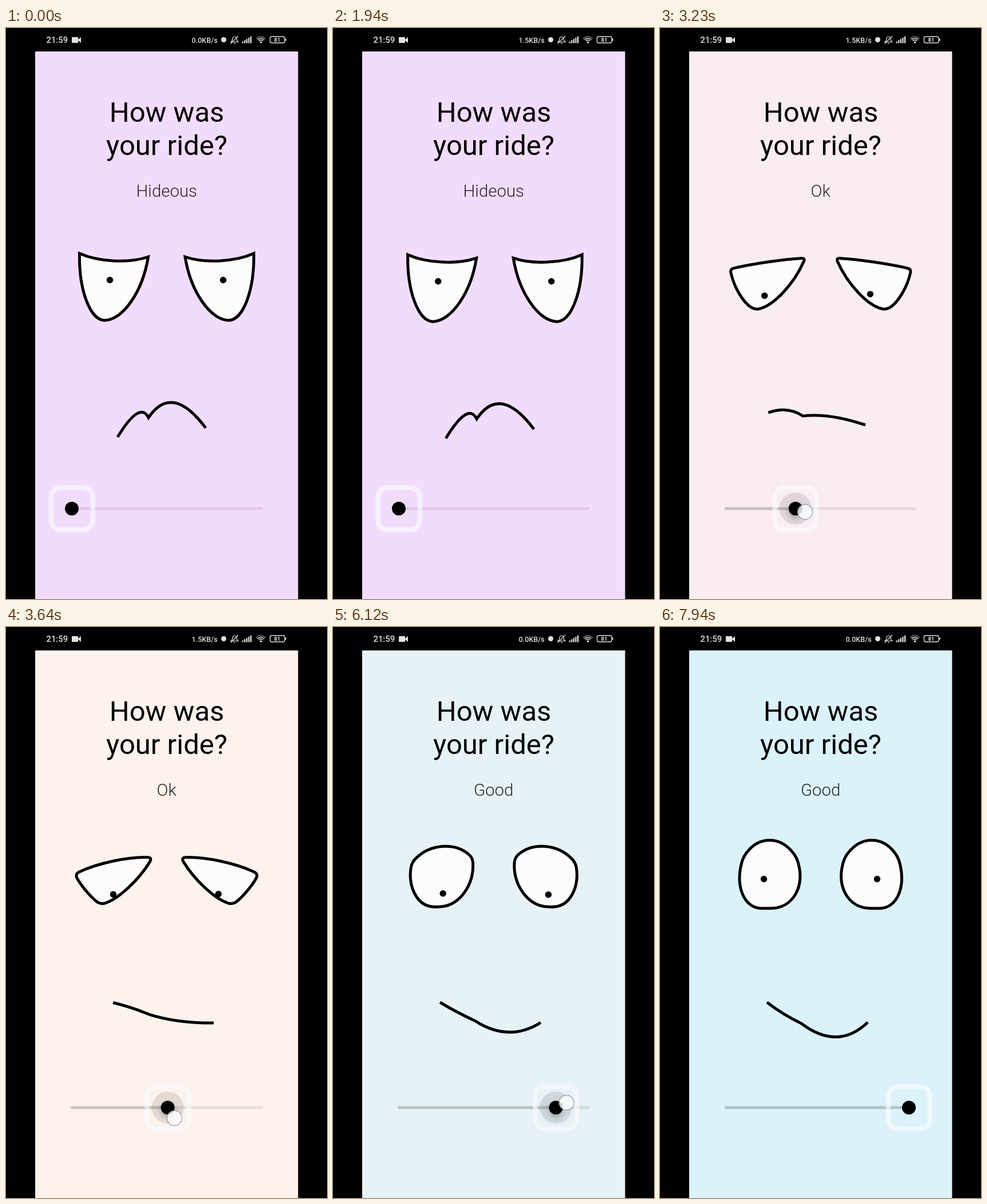
Recreate the animation shown at these times as an HTML page with a canvas. Size 561 by 998 pixels, loop 7990 ms.

```html
<!DOCTYPE html>
<html lang="en">
<head>
<meta charset="utf-8">
<title>Ride rating</title>
<style>
html, body { margin: 0; width: 100%; height: 100%; overflow: hidden; background: #000; }
canvas { display: block; width: 561px; height: 998px; }
</style>
</head>
<body>
<canvas id="stage" width="561" height="998"></canvas>
<script>
const c = document.getElementById("stage").getContext("2d");
const LOOP = 7990, TRACK_Y = 840, INK = "#e2e2e2";

// Moods along the slider. Eye: outer, inner and bottom corner, each followed by
// the point that pulls the edge to the next one. Mouth: two arcs.
const moods = [
  { x: 115, bg: [242, 220, 253], round: 0,
    eye: [[128.5, 394], [188, 421], [248.5, 400], [231, 510], [172, 511], [126, 509]],
    mouth: [[195, 715], [234, 651], [249, 681], [290, 620], [349, 699]] },
  { x: 284, bg: [253, 243, 236], round: 9,
    eye: [[120, 432], [188, 400], [256, 403], [215, 469], [165, 485], [138, 463]],
    mouth: [[187, 656], [218, 664], [250, 677], [298, 693], [363, 692]] },
  { x: 435, bg: [220, 242, 250], round: 10,
    eye: [[145, 403], [191, 341], [239, 403], [262, 488], [187, 492], [123, 490]],
    mouth: [[187, 656], [214, 677], [247, 693], [311, 741], [363, 691]] }
];

// Finger down, thumb starts and stops, finger up; finger offset drifts from a to b.
const drags = [
  { down: 2690, go: 2770, stop: 3800, up: 3880, from: 115, to: 286, a: [22, -8], b: [10, 23] },
  { down: 5350, go: 5720, stop: 6650, up: 6700, from: 286, to: 435, a: [10, 0], b: [30, -20] }
];
const shakes = [40, 1610], SHAKE_MS = 670;

const clamp = v => Math.max(0, Math.min(1, v));
const ease = (v, p = 3) => 1 - (1 - clamp(v)) ** p;
const mix = (a, b, k) => Array.isArray(a) ? a.map((v, i) => mix(v, b[i], k)) : a + (b - a) * k;
const progress = (d, t) => clamp((t - d.go) / (d.stop - d.go));
const thumbAt = t => drags.reduce((x, d) => x + (d.to - d.from) * ease(progress(d, t), 2.1), 115);

function pressure(t, rise, fall) {
  return Math.max(...drags.map(({ down, up }) =>
    t < up ? ease((t - down) / rise) : 1 - ease((t - up) / fall)));
}

function moodAt(x) {
  const [a, b] = x < moods[1].x ? moods : moods.slice(1);
  const k = (x - a.x) / (b.x - a.x), mood = {};
  for (const key in a) mood[key] = mix(a[key], b[key], k);
  return mood;
}

function disc(x, y, r, fill) {
  c.beginPath();
  c.arc(x, y, r, 0, Math.PI * 2);
  c.fillStyle = fill;
  c.fill();
}

function line(x0, y0, x1, y1) {
  c.beginPath();
  c.moveTo(x0, y0);
  c.lineTo(x1, y1);
  c.stroke();
}

function bar(x, w, fill) {
  c.fillStyle = fill;
  c.beginPath();
  c.roundRect(x, TRACK_Y - 2.5, w, 5, 2);
  c.fill();
}

function text(str, x, y, size, weight, fill, align = "center") {
  c.font = `${weight} ${size}px Roboto, sans-serif`;
  c.textAlign = align;
  c.fillStyle = fill;
  c.fillText(str, x, y);
}

function statusBar(t) {
  text("21:59", 70.5, 26, 14.8, 500, INK, "left");
  text(t > 600 && t < 5500 ? "1.5KB/s" : "0.0KB/s", 324.5, 25.5, 12.6, 500, INK, "left");
  c.fillStyle = INK;
  c.fillRect(115, 16, 11, 10);
  c.beginPath();
  c.moveTo(125, 21); c.lineTo(131, 16); c.lineTo(131, 26);
  c.fill();
  disc(380.5, 20.5, 4.5, INK);

  // muted bell
  c.strokeStyle = INK;
  c.lineWidth = 1.2;
  c.beginPath();
  c.moveTo(393, 24.5); c.lineTo(395.5, 22);
  c.bezierCurveTo(395, 13, 404, 13, 403.5, 22);
  c.lineTo(406, 24.5);
  c.closePath();
  c.stroke();
  line(398, 27, 401, 27);
  line(406, 14, 392.5, 27.5);

  // signal, wifi, battery
  for (let i = 0; i < 5; i++) c.fillRect(412.5 + i * 3.6, 23.5 - i * 2.2, 2.3, 3 + i * 2.2);
  c.lineWidth = 1.6;
  for (const r of [11, 8, 5]) {
    c.strokeStyle = r > 10 ? "#777" : INK;
    c.beginPath();
    c.arc(445.5, 26, r, -Math.PI * 0.77, -Math.PI * 0.23);
    c.stroke();
  }
  disc(445.5, 25, 1.8, INK);
  c.lineWidth = 1.4;
  c.beginPath();
  c.roundRect(461.5, 15, 25.5, 11, 3);
  c.stroke();
  c.fillRect(488, 18.5, 1.7, 4);
  text("81", 474, 24, 9.5, 700, INK);
}

// Three curved edges whose corners are cut back by r and rounded.
function eyePath(p, r) {
  const pull = (from, to) => {
    const d = Math.hypot(to[0] - from[0], to[1] - from[1]);
    return mix(from, to, r / d);
  };
  c.beginPath();
  c.moveTo(...pull(p[0], p[1]));
  for (let i = 0; i < 6; i += 2) {
    const k = p[i + 1], end = p[(i + 2) % 6];
    const a = pull(p[i], k), b = pull(end, k);
    c.bezierCurveTo(...mix(a, k, 0.55), ...mix(b, k, 0.55), ...b);
    if (r > 0) c.quadraticCurveTo(...end, ...pull(end, p[(i + 3) % 6]));
  }
  c.closePath();
}

function face(t, { eye, mouth, round }) {
  c.save();
  const start = shakes.find(s => t > s && t < s + SHAKE_MS);
  if (start !== undefined) {
    const d = -2.2 * Math.sin((t - start) / 120 * Math.PI * 2);
    c.translate(d, d);
  }
  c.strokeStyle = "#000";
  c.lineWidth = 5;
  c.miterLimit = 2;
  for (const shape of [eye, eye.map(([x, y]) => [561.5 - x, y])]) {
    eyePath(shape, round);
    c.fillStyle = "#fcfcfc";
    c.fill();
    c.stroke();
  }
  c.beginPath();
  c.moveTo(...mouth[0]);
  c.quadraticCurveTo(...mouth[1], ...mouth[2]);
  c.quadraticCurveTo(...mouth[3], ...mouth[4]);
  c.stroke();

  // pupils trail the thumb
  const reach = 27.4 * pressure(t, 240, 440), gaze = thumbAt(t - 180);
  for (const [x, target] of [[181.5, gaze], [379.5, gaze - 16]]) {
    const a = Math.atan2(target - x, 400);
    disc(x + reach * Math.sin(a), 440.5 + reach * Math.cos(a), 5.7, "#000");
  }
  c.restore();
}

function slider(t, x) {
  bar(x, 448 - x, "rgba(60,30,30,.1)");
  bar(113, x - 113, "rgba(40,40,20,.23)");

  c.strokeStyle = "rgba(250,250,255,.66)";
  c.lineWidth = 8.5;
  c.beginPath();
  c.roundRect(x - 36.2, TRACK_Y - 37, 73, 74, 17);
  c.stroke();

  const press = pressure(t, 160, 300);
  disc(x, TRACK_Y, 14 + 14 * press, `rgba(0,0,0,${0.1 * press})`);
  c.save();
  c.shadowColor = `rgba(0,0,0,${0.25 * press})`;
  c.shadowBlur = 10;
  c.shadowOffsetY = 5;
  disc(x, TRACK_Y, 12, "#000");
  c.restore();

  const drag = drags.find(d => t >= d.down && t < d.up);
  if (drag) {
    const [dx, dy] = mix(drag.a, drag.b, progress(drag, t));
    disc(x + dx, TRACK_Y + dy, 13, "rgba(255,255,255,.8)");
    c.strokeStyle = "rgba(125,130,155,.65)";
    c.lineWidth = 1.5;
    c.stroke();
  }
}

function draw(now) {
  const t = now % LOOP, x = thumbAt(t), mood = moodAt(x);
  c.fillStyle = "#000";
  c.fillRect(0, 0, 561, 998);
  c.fillStyle = `rgb(${mood.bg.map(Math.round)})`;
  c.fillRect(51, 41, 459.5, 957);
  statusBar(t);
  text("How was", 281, 164, 49, 400, "#000");
  text("your ride?", 281, 221.5, 49, 400, "#000");
  text(x < 226 ? "Hideous" : x < 338 ? "Ok" : "Good", 280.7, 294.5, 29.4, 300, "rgba(0,0,0,.84)");
  face(t, mood);
  slider(t, x);
}

const start = performance.now();
function tick() {
  draw(performance.now() - start);
  requestAnimationFrame(tick);
}
tick();
</script>
</body>
</html>
```
